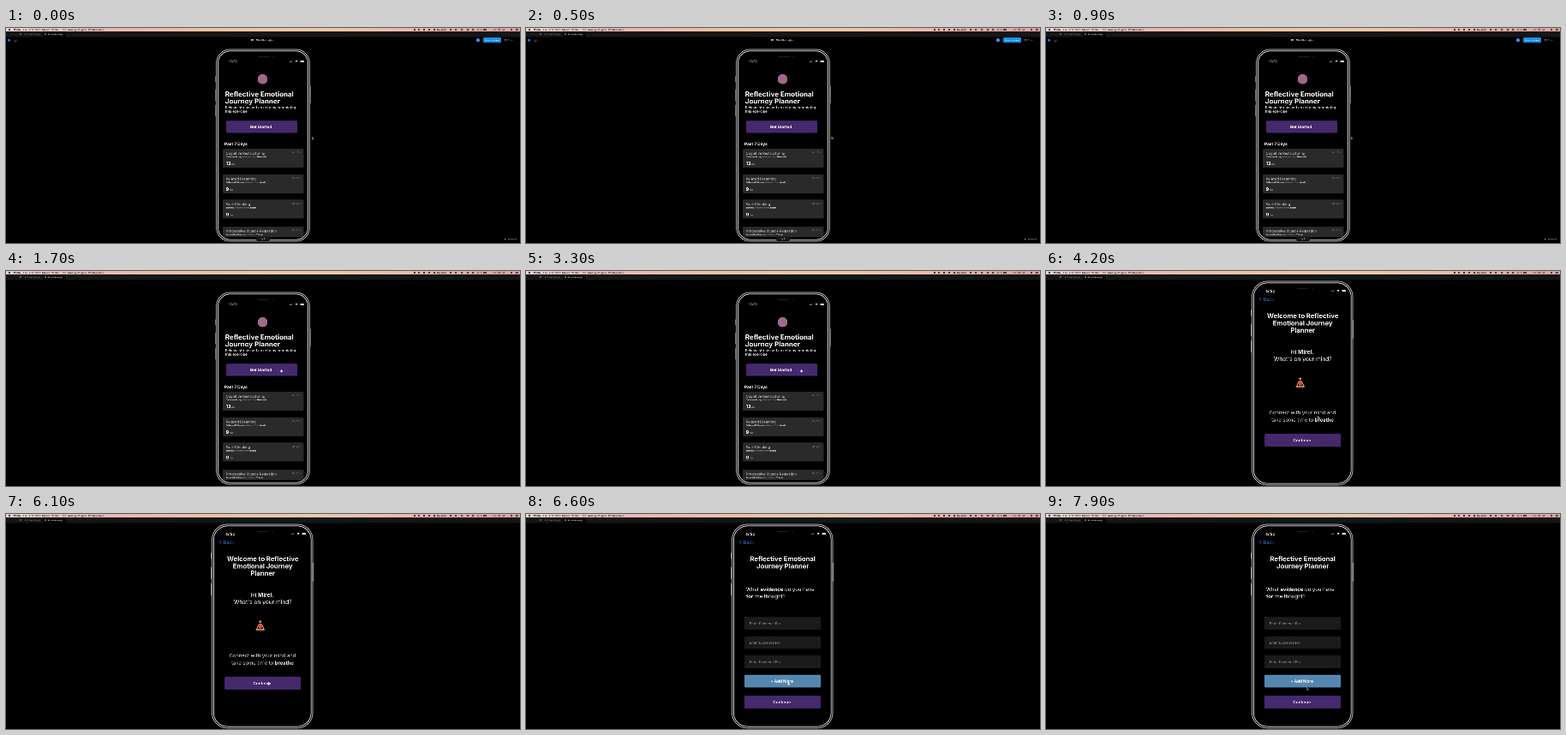
Animation of 600 by 251 pixels, one loop 8000 ms. Source, as an HTML page with a canvas:

```html
<!DOCTYPE html>
<html lang="en">
<head>
<meta charset="utf-8">
<title>App walkthrough</title>
<style>
html, body { margin: 0; width: 100%; height: 100%; overflow: hidden; background: #000; }
canvas { display: block; width: 600px; height: 251px; }
</style>
</head>
<body>
<canvas id="stage"></canvas>
<script>
const W = 600, H = 251, LOOP = 8000;
const SCALE = 4; // oversampling keeps the tiny text smooth
const canvas = document.getElementById('stage');
canvas.width = W * SCALE;
canvas.height = H * SCALE;
const c = canvas.getContext('2d');
c.textRendering = 'geometricPrecision';

const PURPLE = '#44296c', WHITE = '#f4f4f4';
const clamp = (v) => Math.max(0, Math.min(1, v));
const ease = (p) => p * p * (3 - 2 * p);

function setFont(size, weight) {
  c.font = `${weight} ${size}px Inter, "Liberation Sans", sans-serif`;
}

// y is the middle of the capitals
function text(s, x, y, size, weight = 400, color = WHITE, align = 'left') {
  setFont(size, weight);
  c.textAlign = align;
  c.fillStyle = color;
  c.fillText(s, x, y + size * 0.36);
}

// Parts between asterisks are bold
function rich(s, x, y, size, color = WHITE, centered = false, boldColor = color) {
  const runs = s.split('*').map((part, i) => {
    setFont(size, i % 2 ? 700 : 400);
    return { part, bold: i % 2, w: c.measureText(part).width };
  });
  if (centered) x -= runs.reduce((sum, r) => sum + r.w, 0) / 2;
  for (const r of runs) {
    text(r.part, x, y, size, r.bold ? 700 : 400, r.bold ? boldColor : color);
    x += r.w;
  }
}

function box(x, y, w, h, r, color) {
  c.beginPath();
  c.roundRect(x, y, w, h, r);
  c.fillStyle = color;
  c.fill();
}

function outline(x, y, w, h, r, color, width) {
  c.beginPath();
  c.roundRect(x, y, w, h, r);
  c.strokeStyle = color;
  c.lineWidth = width;
  c.stroke();
}

function dot(x, y, r, color) {
  c.beginPath();
  c.arc(x, y, r, 0, Math.PI * 2);
  c.fillStyle = color;
  c.fill();
}

function line(points, color, width) {
  c.beginPath();
  points.forEach(([x, y]) => c.lineTo(x, y));
  c.strokeStyle = color;
  c.lineWidth = width;
  c.stroke();
}

function button(label, x, y, w, h, color, size = 4.7) {
  box(x, y, w, h, 1.2, color);
  text(label, x + w / 2 - 1, y + h / 2, size, 700, WHITE, 'center');
}

function menuBar() {
  const g = c.createLinearGradient(0, 0, W, 0);
  ['#eed6d2', '#eab9b2', '#efc3a4', '#f0cbaa', '#ecb9ac', '#dfa6a4']
    .forEach((color, i) => g.addColorStop(i / 5, color));
  c.fillStyle = g;
  c.fillRect(0, 0, W, 4);
  dot(4, 2, 1, '#333');
  text('Plimo', 9, 2, 2.9, 700, '#222');
  const items = { File: 20, Edit: 27, View: 34, Object: 42, Vector: 53, Text: 64,
    Arrange: 72, Plugins: 84, Window: 96, Help: 108 };
  for (const name in items) text(name, items[name], 2, 2.8, 500, '#333');
  [477, 482, 488, 494].forEach((x, i) => dot(x, 2, 1.2, i === 1 ? '#7c2f35' : '#333'));
  dot(500, 2, 1.2, '#333');
  text('No Task', 503, 2, 2.8, 500, '#333');
  [518, 524, 531, 538, 544].forEach((x) => box(x, 1, 2.4, 2, 0.6, '#444'));
  text('60%', 550, 2, 2.7, 500, '#333');
  box(557, 1.1, 4, 1.8, 0.4, '#444');
  text('Tue 4:29 PM', 565, 2, 2.8, 500, '#333');
  dot(590, 2, 1, '#444');
  box(595, 1, 2.6, 2, 0.3, '#444');
}

function tabBar() {
  c.fillStyle = '#141717';
  c.fillRect(0, 4, W, 6.5);
  c.fillStyle = '#060707';
  c.fillRect(43, 4, 27, 6.5);
  box(16, 6.2, 2, 2, 0.5, '#5c6262');
  text('REJ Walkthrough', 22, 7.4, 2.2, 400, '#8c9292');
  dot(46, 7.3, 0.9, '#7d8585');
  text('REJ Walkthrough', 48.5, 7.4, 2.2, 500, '#e3e6e6');
}

function toolbar(alpha) {
  if (alpha <= 0) return;
  c.globalAlpha = alpha;
  dot(3.5, 14.3, 1.5, '#2378c8');
  outline(9.7, 12.9, 2.6, 2.6, 1.3, '#777', 0.5);
  text('REJ Walkthrough', 298, 14.3, 2.9, 600, '#ddd', 'center');
  line([[310.3, 13.8], [311.2, 14.7], [312.1, 13.8]], '#888', 0.4);
  dot(551, 14.2, 2.2, '#3f86d8');
  box(557, 11.2, 21, 6, 1, '#1590e8');
  text('Share prototype', 567.5, 14.2, 2.1, 600, '#fff', 'center');
  text('100%', 582, 14.2, 2.5, 400, '#bbb');
  line([[589.5, 13.9], [590.3, 14.6], [591.1, 13.9]], '#888', 0.4);
  box(292, 243.6, 16, 5.2, 1.5, '#161616');
  text('1 / 6', 300, 246.2, 2.6, 600, '#ddd', 'center');
  line([[582, 246.5], [583.5, 246.5]], '#aaa', 0.5);
  text('Restart  R', 586, 246.4, 2.3, 500, '#aaa');
  c.globalAlpha = 1;
}

function phone(x, y, w, h, r) {
  for (const [p, len] of [[0.14, 0.03], [0.21, 0.06], [0.29, 0.06]]) {
    box(x - 1.2, y + h * p, 1.2, h * len, 0.3, '#b8b8b8');
  }
  box(x + w, y + h * 0.19, 1.2, h * 0.09, 0.3, '#b8b8b8');
  box(x, y, w, h, r, '#000');
  outline(x, y, w, h, r, '#a8a8a8', 1);
  outline(x + 1.9, y + 1.9, w - 3.8, h - 3.8, r - 1.9, '#d6d6d6', 0.9);
  const mid = x + w / 2;
  box(mid - 6, y + 8, 13, 1, 0.5, '#202020');
  dot(mid + 12, y + 8.5, 0.9, '#1a1a20');
}

function statusBar(x, y, right, size) {
  text('12:22', x, y, size, 600, WHITE);
  for (let i = 0; i < 4; i++) {
    const h = 0.8 + i * 0.4;
    box(right - 18 + i * 0.9, y + 1 - h, 0.6, h, 0, '#ddd');
  }
  c.beginPath();
  c.moveTo(right - 10, y + 1);
  c.arc(right - 10, y + 1, 2.2, -2.3, -0.84);
  c.fillStyle = '#ddd';
  c.fill();
  box(right - 5.5, y - 1.1, 4.6, 2.2, 0.6, '#ddd');
}

const cards = [
  [141, 'Cognitive Restructuring', 'Catastrophizing', 'Pixovanel', '13', 'Oct 28'],
  [170.8, 'Relaxed Breathing', 'Fallacy of Fairness', 'Vondro', '9', 'Oct 27'],
  [200.4, 'Fact-Checking', 'Blaming', 'Chirpel', '9', 'Oct 26'],
  [231.8, 'Progressive Muscle Relaxation', 'Personalization', 'Thebo', '13', 'Oct 25'],
];

function card([y, title, kind, app, mins, date]) {
  const h = Math.min(22, 244 - y);
  box(253, y, 94.5, h, 1.2, '#2a2a2a');
  text(title, 256.7, y + 5.2, 4.05, 500, '#b9b6a2');
  rich(`*${kind}* detected from *${app}*`, 256.7, y + 9.3, 2.4, '#a5a5a5', false, WHITE);
  text(date + ' ›', 344, y + 4.3, 2.6, 400, '#858585', 'right');
  if (h < 20) return;
  text(mins, 256.7, y + 17.2, 5.3, 700);
  text('min', mins.length > 1 ? 263.3 : 260.8, y + 18, 2.4, 500, '#c8c8c8');
}

function home() {
  phone(245.7, 25, 108.6, 224, 16);
  statusBar(259.8, 39, 349, 3.8);
  dot(299.5, 59.7, 5.8, '#a0688a');
  text('Reflective Emotional', 255.8, 77, 8, 700);
  text('Journey Planner', 255.8, 85.3, 8, 700);
  text('Relieve stress and anxiety by completing', 255.8, 92.8, 4.3, 500, '#e4e4e4');
  text('this exercise', 255.8, 97.2, 4.3, 500, '#e4e4e4');
  button('Get Started', 256.8, 108.3, 83.4, 14.2, PURPLE, 4.6);
  text('Past 7 Days', 255, 135.3, 4.75, 700);
  cards.forEach(card);
}

function innerFrame() {
  phone(240.6, 12, 117.4, 238, 18);
  statusBar(256.5, 23.2, 351, 4);
  line([[251.2, 30.8], [249.4, 32.8], [251.2, 34.8]], '#2563b8', 0.7);
  text('Back', 253.8, 32.8, 5.3, 400, '#2563b8');
}

function heading(lines) {
  lines.forEach((s, i) => text(s, 299.7, 52.3 + i * 8.4, 7.65, 700, WHITE, 'center'));
}

// Little person sitting cross-legged
function sitter(x, y) {
  const skin = '#d99c68';
  line([[x - 1.2, y - 2], [x - 3, y + 1.4], [x - 4, y + 3.4]], skin, 1.1);
  line([[x + 1.2, y - 2], [x + 3, y + 1.4], [x + 4, y + 3.4]], skin, 1.1);
  box(x - 1.7, y - 2.6, 3.4, 6, 1.1, '#d5532d');
  dot(x, y - 4.9, 1.6, '#5b3826');
  dot(x, y - 4.3, 1.3, skin);
  c.beginPath();
  c.ellipse(x, y + 4.6, 5.6, 1.3, 0, 0, Math.PI * 2);
  c.fillStyle = '#c98a5e';
  c.fill();
  box(x - 2.4, y + 3, 4.8, 1.4, 0.7, '#8a442e');
}

function welcome() {
  innerFrame();
  heading(['Welcome to Reflective', 'Emotional Journey', 'Planner']);
  rich('Hi *Mirel*.', 299, 94.3, 6.6, WHITE, true);
  text("What's on your mind?", 299.8, 102.7, 6.6, 400, WHITE, 'center');
  sitter(296.8, 130.3);
  text('Connect with your mind and', 299.5, 165.2, 5.85, 400, '#c9c9c9', 'center');
  rich('take some time to *breathe*', 299.5, 173.7, 5.85, '#c9c9c9', true, WHITE);
  button('Continue', 255.3, 190.2, 89, 14.8, PURPLE);
}

function evidence() {
  innerFrame();
  heading(['Reflective Emotional', 'Journey Planner']);
  rich('What *evidence* do you have', 257, 87.8, 6);
  rich('*for* the thought?', 257, 96.2, 6);
  for (let i = 0; i < 3; i++) {
    const y = 120.4 + i * 22.4;
    box(255, y, 89.3, 14.6, 0.8, '#1b1b1b');
    text('Enter Evidence For', 260.8, y + 7.4, 4.1, 400, '#929292');
  }
  button('+ Add More', 255, 187.6, 89.3, 14.9, '#5487b0');
  button('Continue', 255, 212.2, 89.3, 14.9, PURPLE);
}

// time, x, y of the pointer tip
const path = [
  [0, 357.3, 127], [900, 356.3, 126.8], [1100, 354, 127], [1600, 321, 114.8],
  [3400, 321, 114.8], [3900, 318, 122], [4100, 317, 142], [4200, 317.5, 169.5],
  [4500, 317.5, 169.5], [5100, 306, 196], [7000, 306, 196], [7160, 305, 217],
  [7450, 308, 165], [7550, 308, 165], [7900, 304.2, 202.5], [8000, 304.2, 202.5],
];

function pointerAt(t) {
  const i = Math.max(1, path.findIndex((p) => p[0] > t));
  const [t0, x0, y0] = path[i - 1], [t1, x1, y1] = path[i];
  const p = ease(clamp((t - t0) / (t1 - t0)));
  return [x0 + (x1 - x0) * p, y0 + (y1 - y0) * p];
}

function pointer(t) {
  const [x, y] = pointerAt(t);
  const onButton = (t > 1480 && t < 3500) || (t > 4900 && t < 7060);
  if (onButton) {
    box(x - 0.2, y, 0.9, 2.6, 0.45, '#eee');
    box(x - 0.6, y + 1.4, 2.3, 2.2, 0.7, '#eee');
    line([[x + 0.8, y + 1.8], [x + 0.8, y + 3]], '#333', 0.3);
    return;
  }
  c.beginPath();
  [[0, 0], [0, 2.9], [0.7, 2.3], [1.2, 3.3], [1.7, 3], [1.3, 2.2], [2.1, 2.1]]
    .forEach(([dx, dy]) => c.lineTo(x + dx, y + dy));
  c.closePath();
  c.fillStyle = '#111';
  c.fill();
  c.strokeStyle = '#a8a8a8';
  c.lineWidth = 0.4;
  c.stroke();
}

function draw(t) {
  c.setTransform(SCALE, 0, 0, SCALE, 0, 0);
  c.fillStyle = '#000';
  c.fillRect(0, 0, W, H);
  if (t < 3400) home();
  else if (t < 6600) welcome();
  else evidence();
  menuBar();
  tabBar();
  toolbar(1 - clamp((t - 1200) / 250));
  pointer(t);
}

const start = performance.now();
function tick() {
  draw((performance.now() - start) % LOOP);
  requestAnimationFrame(tick);
}
tick();
</script>
</body>
</html>
```
